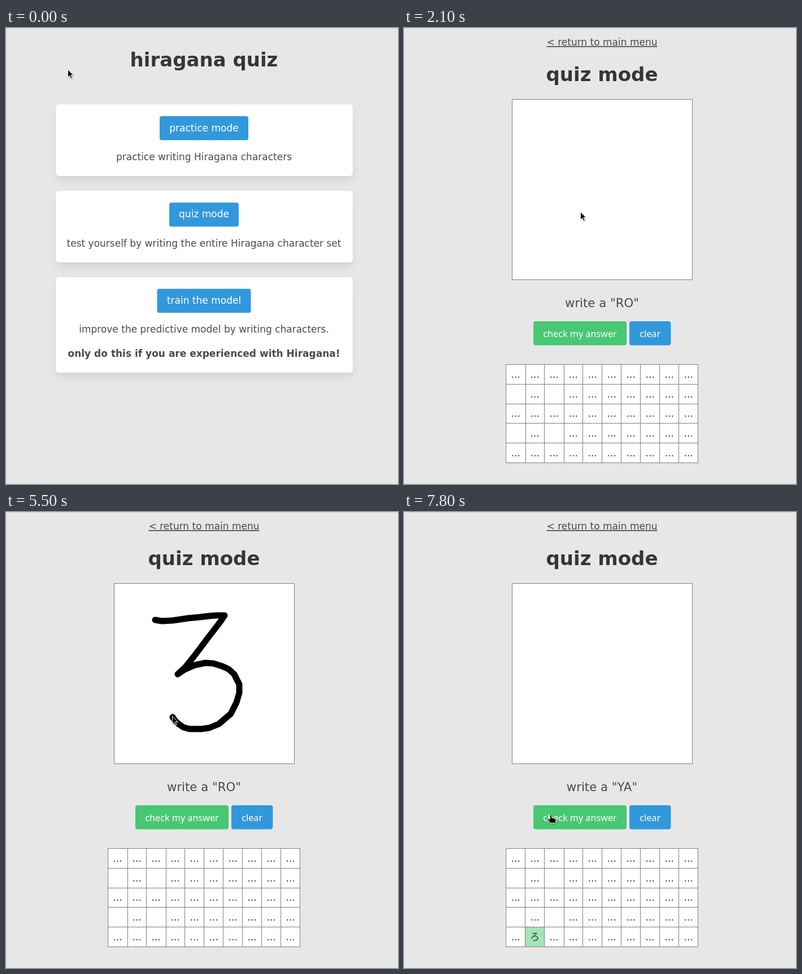
These frames come from a looping animation (694 by 807 pixels, 8 s). An HTML page:

```html
<!DOCTYPE html>
<html lang="en">
<head>
<meta charset="utf-8">
<title>hiragana quiz</title>
<style>
html, body { margin: 0; width: 100%; height: 100%; overflow: hidden; background: #e7e7e7; }
svg { position: absolute; left: 0; top: 0; }
#cards div {
  position: absolute; left: 87.5px; width: 526px; background: #fff; border-radius: 6px;
  box-shadow: 0 8.5px 17px -2px rgba(10,10,10,.1), 0 0 0 1px rgba(10,10,10,.02);
}
text { font: 17px "DejaVu Sans", sans-serif; fill: #4a4a4a; text-anchor: middle; }
.title { font-size: 34px; font-weight: bold; fill: #363636; }
.bold { font-weight: bold; }
.link { text-decoration: underline; }
.prompt { font-size: 21.25px; }
.label { fill: #fff; }
.answer { font: 16.2px "Noto Sans", sans-serif; }
.kana { font: 17px "Noto Sans CJK JP", "Noto Sans CJK", sans-serif; fill: #363636; }
.cell { fill: #363636; }
.blue { fill: #3298dc; }
.green { fill: #48c774; }
.line { fill: none; stroke: #808080; }
#ink { fill: none; stroke: #000; stroke-width: 11; stroke-linecap: round; stroke-linejoin: round; }
#ring { fill: none; stroke-width: 2; }
#cursor { filter: drop-shadow(1px 1px 1px rgba(0,0,0,.3)); }
#cursor path { fill: #000; stroke: #fff; stroke-linejoin: round; }
</style>
</head>
<body>
<div id="cards">
  <div style="top:135px;height:127px"></div>
  <div style="top:288px;height:127px"></div>
  <div style="top:441px;height:169px"></div>
</div>
<svg width="694" height="807">
  <rect width="694" height="1" fill="#d2d2d2"/>
  <g id="menu"></g>
  <g id="quiz"></g>
  <rect id="ring" height="44" rx="5"/>
  <g id="cursor">
    <path id="arrow" d="M.5 .5V14.2L3.6 11.4 5.9 16.5 8.2 15.4 5.9 10.5H10.2Z"/>
    <path id="hand" d="M-.5 1.5q1.5-2 3 0v4.5l5.5 1.2q2 .5 2 2.5v2l-1.3 3.8h-8.2l-4.8-5.5q-1.2-1.5.2-2.5l3.6 1.5z"/>
  </g>
</svg>
<script>
const $ = id => document.getElementById(id);
const MID = 350.5;

const text = (str, y, cls = '', x = MID, id = '') =>
  `<text x="${x}" y="${y}" class="${cls}" id="${id}">${str}</text>`;
const button = (str, x, y, w, base, cls, id = '', font = '') =>
  `<rect id="${id}" class="${cls}" x="${x}" y="${y}" width="${w}" height="42.4" rx="4"/>` +
  text(str, base, 'label ' + font, x + w / 2);

$('menu').innerHTML =
  text('hiragana quiz', 68, 'title') +
  button('practice mode', 272, 156, 157, 183, 'blue') +
  text('practice writing Hiragana characters', 234) +
  button('quiz mode', 289, 309, 123, 335, 'blue', 'start') +
  text('test yourself by writing the entire Hiragana character set', 387) +
  button('train the model', 267.5, 461.6, 166, 488, 'blue') +
  text('improve the predictive model by writing characters.', 539) +
  text('only do this if you are experienced with Hiragana!', 582, 'bold');

function table() {
  const colX = i => 180.5 + 34 * i + (i == 3);
  const rowY = i => Math.round(595 + 34.8 * i) + .5;
  let out = '<rect x="180" y="595" width="341" height="175" fill="#fff"/>' +
    '<rect id="done" x="214" y="735" width="35" height="35" fill="#a3e3b9"/>';
  for (let i = 0; i <= 10; i++)
    out += `<path class="line" id="col${i}" d="M${colX(i)} 595V770"/>`;
  for (let i = 0; i <= 5; i++)
    out += `<path class="line" d="M180 ${rowY(i)}H521"/>`;
  for (let r = 0; r < 5; r++)
    for (let c = 0; c < 10; c++)
      if (r % 2 == 0 || c == 1 || c > 2)
        out += text('...', Math.round(618.7 + 34.8 * r), 'cell', 197.7 + 34 * c, `cell${r}${c}`);
  return out + text('ろ', 758, 'kana', 231.5, 'kana');
}

$('quiz').innerHTML =
  text('&lt; return to main menu', 31, 'link') +
  text('quiz mode', 94, 'title') +
  '<rect x="191.5" y="126.5" width="319" height="319" fill="#fff" stroke="#808080"/>' +
  '<polyline id="ink"/>' +
  text('', 494, 'prompt', MID, 'prompt') +
  button('check my answer', 229, 519, 165, 547, 'green', 'check', 'answer') +
  button('clear', 399, 519, 73.4, 547, 'blue', '', 'answer') +
  table();

const stroke = [
  [264,191], [276,193], [295,192], [309,190], [322,188], [343,186], [360,184], [373,183],
  [387,183], [381,192], [375,200], [365,213], [355,226], [343,242], [330,259], [318,274],
  [304,287], [316,279], [334,271], [353,267], [367,268], [383,273], [394,278], [404,287],
  [413,305], [413,320], [408,337], [398,357], [377,375], [360,382], [346,384], [325,384],
  [314,381], [304,374], [299,369], [295,363]
];
// [time, points drawn]
const inkSteps = [[0, 0], [4500, 3], [4600, 6], [4700, 10], [4800, 13], [4900, 16],
  [5100, 22], [5400, 27], [5500, 36], [7800, 0]];
// [time, x, y] of the pointer tip
const path = [
  [0, 109, 73], [200, 109, 73], [1100, 248, 296], [1400, 318, 331], [1600, 312, 325],
  [2900, 312, 325], [3000, 569, 279], [4200, 569, 279], [4400, 263, 189], [4500, 310, 187],
  [4600, 375, 182], [4700, 363, 211], [4800, 331, 253], [4900, 305, 279], [5000, 305, 279],
  [5100, 400, 284], [5300, 400, 284], [5400, 398, 356], [5500, 294, 361], [6400, 294, 361],
  [6500, 289, 366], [6600, 289, 366], [6800, 193, 460], [6900, 226, 497], [7000, 226, 497],
  [7100, 242, 528], [7200, 258, 535], [7300, 258, 535], [7400, 259, 535], [8000, 259, 535]
];

const lastStep = (list, t) => list.filter(s => s[0] <= t).pop();

function pointer(t) {
  const i = path.findIndex(k => k[0] > t);
  const [t0, x0, y0] = path[i - 1], [t1, x1, y1] = path[i];
  const p = (t - t0) / (t1 - t0);
  return [Math.round(x0 + (x1 - x0) * p), Math.round(y0 + (y1 - y0) * p)];
}

const show = (el, on) => el.style.display = on ? '' : 'none';

function draw(time) {
  const t = Math.floor(time % 8000 / 100) * 100;
  const inQuiz = t >= 2100, solved = t >= 7800, hand = t >= 7200;
  const [x, y] = pointer(t);
  show($('cards'), !inQuiz);
  show($('menu'), !inQuiz);
  show($('quiz'), inQuiz);

  const overStart = x >= 289 && y >= 309;
  $('start').style.fill = t == 1900 ? '#238cd1' : overStart ? '#2793da' : '';
  $('check').style.fill = t < 7100 || solved ? '' : t >= 7400 && t < 7600 ? '#3abb67' : '#3ec46d';

  const ring = $('ring'), onCheck = t >= 7600;
  show(ring, t == 2000 || onCheck && !solved);
  ring.setAttribute('x', onCheck ? 228 : 288);
  ring.setAttribute('y', onCheck ? 518 : 308);
  ring.setAttribute('width', onCheck ? 167 : 125);
  ring.style.stroke = onCheck ? 'rgba(72,199,116,.25)' : 'rgba(50,152,220,.25)';

  const count = lastStep(inkSteps, t)[1];
  $('ink').setAttribute('points', stroke.slice(0, count).join(' '));
  $('prompt').textContent = `write a "${solved ? 'YA' : 'RO'}"`;
  $('col1').setAttribute('transform', `translate(${solved ? 0 : 1})`);
  show($('done'), solved);
  show($('kana'), solved);
  show($('cell41'), !solved);

  $('cursor').setAttribute('transform', `translate(${x} ${y})`);
  show($('arrow'), !hand);
  show($('hand'), hand);
}

const start = performance.now();
function loop() {
  draw(performance.now() - start);
  requestAnimationFrame(loop);
}
loop();
</script>
</body>
</html>
```
